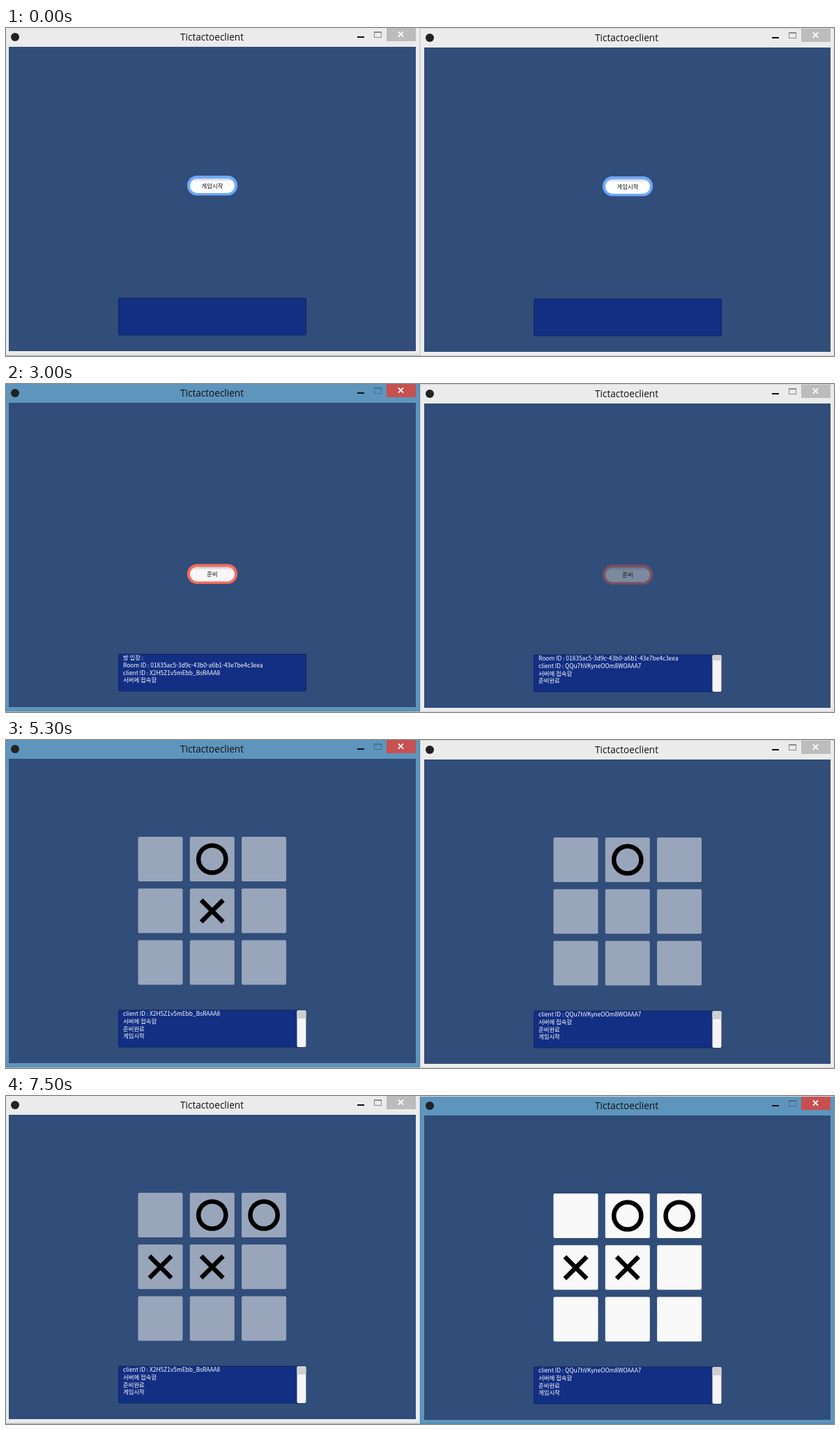
Write an HTML page with a canvas that moves like this. It is 1188 px wide and 471 px high and loops after 8 s.

```html
<!DOCTYPE html>
<html lang="ko">
<head>
<meta charset="utf-8">
<title>Tictactoeclient</title>
<style>
html, body { margin: 0; width: 100%; height: 100%; overflow: hidden; background: #ebebeb; }
canvas { display: block; }
</style>
</head>
<body>
<canvas id="stage" width="1188" height="471"></canvas>
<script>
const ctx = document.getElementById('stage').getContext('2d');
const LOOP = 8000;
const SMALL_FONT = '8.4px "Noto Sans CJK KR", "Noto Sans CJK", sans-serif';
const START = { label: '게임시작', y: 212, rim: [110, 168, 250] };
const READY = { label: '준비', y: 258.5, rim: [251, 111, 96] };
const NORMAL = [1, 1], HOVER = [0.97, 1], PRESSED = [0.78, 1], DISABLED = [0.78, 0.5];

const logFor = (entry, id) => [entry, 'Room ID : 01835ac5-3d9c-43b0-a6b1-43e7be4c3eea',
  'client ID : ' + id, '서버에 접속함', '준비완료', '게임시작'];
const logs = [logFor('방 입장 :', 'X2H5Z1v5mEbb_BsRAAA8'), logFor('방 생성 :', 'QQu7hVKyneOOm8WOAAA7')];

// [time, window that takes the focus]
const focus = [[700, 1], [2300, 0], [4400, 1], [5300, 0], [6100, 1], [6700, 0], [7500, 1]];

// [time, window, changes]
const open = '#f9f9f9', first = '#f9fbff', locked = '#98a5bb';
const events = [
  [0, 0, { button: START, tint: NORMAL, lines: 0, tile: null, marks: '' }],
  [0, 1, { button: START, tint: NORMAL, lines: 0, tile: null, marks: '' }],
  [700, 1, { tint: HOVER }],
  [800, 1, { tint: PRESSED }],
  [900, 1, { tint: HOVER }],
  [1300, 1, { button: READY, tint: NORMAL, lines: 4 }],
  [1400, 1, { tint: HOVER }],
  [1600, 1, { tint: PRESSED }],
  [1700, 1, { tint: DISABLED }],
  [1800, 1, { lines: 5 }],
  [2300, 0, { tint: HOVER }],
  [2400, 0, { tint: PRESSED }],
  [2500, 0, { tint: HOVER }],
  [3000, 0, { button: READY, lines: 4 }],
  [3400, 0, { tint: PRESSED }],
  [3500, 0, { tint: DISABLED }],
  [3600, 0, { lines: 5 }],
  [3700, 0, { button: null, lines: 6, tile: locked }],
  [3700, 1, { button: null, lines: 6, tile: first }],
  [4500, 1, { marks: ' O', tile: locked }],
  [4700, 0, { marks: ' O', tile: open }],
  [5300, 0, { marks: ' O  X', tile: locked }],
  [5600, 1, { marks: ' O  X', tile: open }],
  [6100, 1, { marks: ' OO X', tile: locked }],
  [6400, 0, { marks: ' OO X', tile: open }],
  [6800, 0, { marks: ' OOXX', tile: locked }],
  [7000, 1, { marks: ' OOXX', tile: open }]
];

function rect(x, y, w, h, color) {
  ctx.fillStyle = color;
  ctx.fillRect(x, y, w, h);
}

function rounded(x, y, w, h, r, color) {
  ctx.fillStyle = color;
  ctx.beginPath();
  ctx.roundRect(x, y, w, h, r);
  ctx.fill();
}

function text(str, x, y, font, color, align) {
  ctx.font = font;
  ctx.fillStyle = color;
  ctx.textAlign = align;
  ctx.fillText(str, x, y);
}

function cross(x, y, r, width, color) {
  ctx.strokeStyle = color;
  ctx.lineWidth = width;
  ctx.beginPath();
  ctx.moveTo(x - r, y - r);
  ctx.lineTo(x + r, y + r);
  ctx.moveTo(x + r, y - r);
  ctx.lineTo(x - r, y + r);
  ctx.stroke();
}

function drawChrome(active) {
  rect(-1, 0, 595, 470, active ? '#5d95bd' : '#ebebeb');
  rect(-1, 0, 1, 470, active ? '#5283a6' : '#d6d6d6');
  rect(593, 0, 1, 470, active ? '#5283a6' : '#d6d6d6');
  rect(-1, 469, 595, 1, active ? '#5283a6' : '#d6d6d6');
  ctx.fillStyle = '#222';
  ctx.beginPath();
  ctx.arc(13, 13, 6, 0, Math.PI * 2);
  ctx.fill();
  text('Tictactoeclient', 295.5, 18, '13.6px "Open Sans", "Noto Sans", sans-serif', '#111', 'center');
  rect(504, 12, 10, 2, '#111');
  const gray = active ? '#486f8b' : '#8c8c8c';
  ctx.strokeStyle = gray;
  ctx.lineWidth = 1;
  ctx.strokeRect(528.5, 5.5, 10, 8);
  rect(528, 5, 11, 2, gray);
  rect(546, 0, 42, 19, active ? '#c75050' : '#bcbcbc');
  cross(566.5, 9, 3.6, 1.8, '#fff');
}

function drawButton({ label, y, rim }, [shade, alpha]) {
  const tinted = rgb => `rgb(${rgb.map(v => Math.round(v * shade))})`;
  ctx.globalAlpha = alpha;
  rounded(260, y, 72, 28.5, 14, tinted(rim));
  // Replaces the rim under the face so both blend with the backdrop once
  if (alpha < 1) {
    ctx.globalAlpha = 1;
    rounded(264, y + 4, 64, 21, 10.5, '#314d79');
    ctx.globalAlpha = alpha;
  }
  const face = ctx.createLinearGradient(0, y + 4, 0, y + 9);
  face.addColorStop(0, tinted([205, 208, 216]));
  face.addColorStop(1, tinted([255, 255, 255]));
  rounded(264, y + 4, 64, 21, 10.5, face);
  ctx.globalAlpha = 1;
  text(label, 296, y + 17.5, SMALL_FONT, '#111', 'center');
}

function drawBoard(color, marks) {
  for (let i = 0; i < 9; i++) {
    const x = 189.5 + (i % 3) * 74.3, y = 139 + Math.floor(i / 3) * 74.3;
    rounded(x, y, 64, 64, 2, color);
    if (marks[i] === 'O') {
      ctx.strokeStyle = '#000';
      ctx.lineWidth = 6.5;
      ctx.beginPath();
      ctx.arc(x + 32, y + 32, 19.6, 0, Math.PI * 2);
      ctx.stroke();
    } else if (marks[i] === 'X') {
      cross(x + 32, y + 32.3, 15.7, 6.5, '#000');
    }
  }
}

function drawLog(lines, count) {
  rounded(161, 387.5, 270, 54, 3, '#10265f');
  rounded(162, 388.5, 268, 52, 2.5, '#122f83');
  ctx.save();
  ctx.beginPath();
  ctx.rect(162, 388, 268, 53);
  ctx.clip();
  lines.slice(Math.max(0, count - 4), count).forEach((line, i) =>
    text(line, 168, 396 + i * 10.8, SMALL_FONT, '#fff', 'left'));
  ctx.restore();
  if (count > 4) {
    rounded(417.5, 388, 13, 53, 2, '#f5f5f5');
    rounded(417.5, 388, 13, count === 5 ? 8 : 12, 2, '#cfcfcf');
  }
}

function drawWindow(index, state, active) {
  ctx.save();
  ctx.translate(index * 595, index);
  drawChrome(active);
  ctx.translate(index, 0);
  rect(4, 27, index ? 583 : 584, 437, '#314d79');
  if (state.button) drawButton(state.button, state.tint);
  if (state.tile) drawBoard(state.tile, state.marks);
  drawLog(logs[index], state.lines);
  ctx.restore();
}

function frame() {
  const t = performance.now() % LOOP;
  const states = [{}, {}];
  for (const [time, index, change] of events) {
    if (time <= t) Object.assign(states[index], change);
  }
  const focused = focus.reduce((now, [time, index]) => time <= t ? index : now, -1);
  rect(0, 0, 1188, 471, '#d6d6d6');
  rect(0, 470, 594, 1, '#a9c4c6');
  states.forEach((state, i) => drawWindow(i, state, i === focused));
  requestAnimationFrame(frame);
}
requestAnimationFrame(frame);
</script>
</body>
</html>
```
